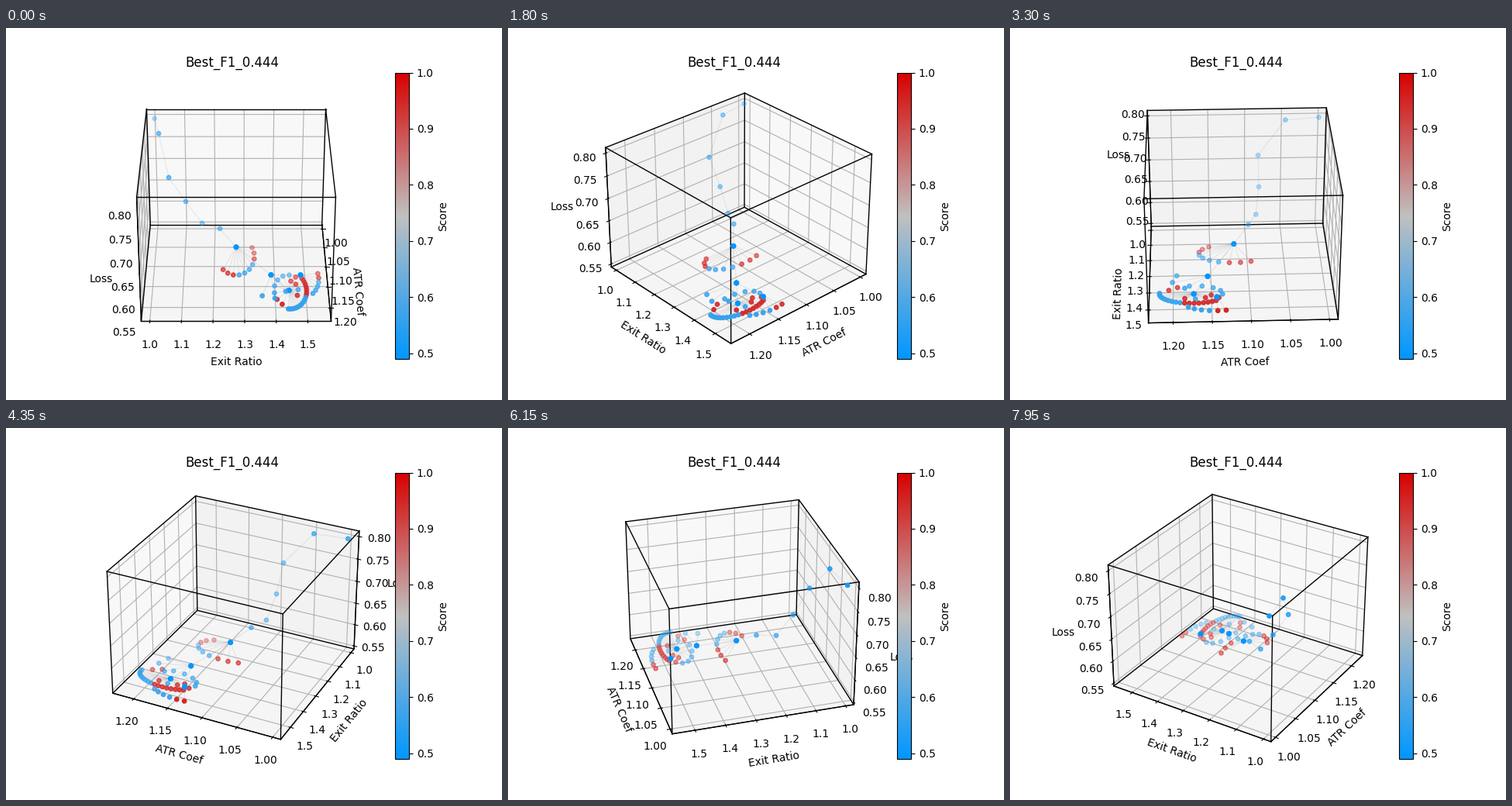
A matplotlib script for the animation above (8 s loop, 640 by 480 pixels).

```python
from itertools import combinations, product

import matplotlib.pyplot as plt
import numpy as np
from matplotlib.animation import FuncAnimation
from matplotlib.colors import LinearSegmentedColormap
from mpl_toolkits.mplot3d.art3d import Line3DCollection

INTERVAL, FRAMES = 50, 160
HOLD = 3          # frames per rotation step
STEP_DEG = 4
HUB_REPEATS = 6   # hubs were sampled repeatedly, so they look opaque
LOW, BLUE, RED = 0.4895, 0.56, 0.95
ATR_RADIUS, EXIT_RADIUS = 0.047, 0.060
LIMITS = [(0.9890, 1.2315), (0.9727, 1.5737), (0.5430, 0.8120)]

# Key points as ATR coef, exit ratio, loss
trunk = np.array([
    (1.0000, 1.0000, 0.7990), (1.0457, 1.0188, 0.8000),
    (1.0830, 1.0529, 0.7319), (1.0827, 1.1071, 0.6778),
    (1.0874, 1.1601, 0.6324), (1.0985, 1.2195, 0.6297)])
hubs = np.array([
    (1.1187, 1.2732, 0.6051), (1.1545, 1.3867, 0.5740),
    (1.1433, 1.4839, 0.5634), (1.1731, 1.4443, 0.5561)])
first, second, right, best = hubs


def arc(hub, loss, start, stop, count, blue, scale=1):
    """Neighbours on an ellipse around a hub, red outside the blue range."""
    t = np.linspace(0, 1, count)
    angle = np.radians(start + (stop - start) * t)
    xyz = np.column_stack([hub[0] + scale * ATR_RADIUS * np.sin(angle),
                           hub[1] + scale * EXIT_RADIUS * np.cos(angle),
                           np.full(count, loss)])
    score = np.where((blue[0] <= t) & (t <= blue[1]), BLUE, RED)
    return hub, xyz, score


arcs = [
    arc(first, 0.584, -28, 135, 10, blue=(0.25, 0.75)),
    arc(second, 0.565, 40, 120, 3, blue=(0, 1)),
    arc(right, 0.556, -14, 52, 6, blue=(0.3, 1)),
    arc(best, 0.557, -40, 95, 18, blue=(0.45, 1), scale=0.95),
    arc(best, 0.556, 120, 300, 8, blue=(0.25, 0.9), scale=0.8),
    arc(best, 0.556, -75, 30, 4, blue=(0.5, 0.8), scale=0.5),
]

points = np.vstack([trunk, *(xyz for _, xyz, _ in arcs),
                    np.repeat(hubs, HUB_REPEATS, axis=0)])
scores = np.concatenate([np.full(len(trunk), 0.52),
                         *(score for _, _, score in arcs),
                         np.full(len(hubs) * HUB_REPEATS, LOW)])

path = [*trunk, first, second]
edges = [*zip(path, path[1:]), (second, right), (second, best)]
edges += [(hub, end) for hub, xyz, _ in arcs for end in xyz]
# Two corners share a box edge when they differ along one axis only
box = [pair for pair in combinations(product(*LIMITS), 2)
       if sum(a != b for a, b in zip(*pair)) == 1]

fig = plt.figure(figsize=(6.4, 4.8), dpi=100)
ax = fig.add_subplot(projection="3d", computed_zorder=False)
cmap = LinearSegmentedColormap.from_list(
    "score", ["#0096ff", "#c0c0c0", "#d80000"])

ax.add_collection3d(Line3DCollection(
    edges, colors="0.5", alpha=0.15, linewidths=0.8, zorder=1))
for ends in box:
    ax.plot(*zip(*ends), color="black", linewidth=1, zorder=2)
dots = ax.scatter(*points.T, c=scores, cmap=cmap, vmin=LOW, vmax=1,
                  s=15, zorder=3)

ax.set(xlim=LIMITS[0], ylim=LIMITS[1], zlim=LIMITS[2],
       xlabel="ATR Coef", ylabel="Exit Ratio", title="Best_F1_0.444")
ax.zaxis.set_rotate_label(False)
ax.set_zlabel("Loss", rotation=0)
fig.colorbar(dots, ax=ax, label="Score")


def update(frame):
    ax.view_init(elev=30, azim=frame // HOLD * STEP_DEG)
    return []


anim = FuncAnimation(fig, update, frames=FRAMES, interval=INTERVAL,
                     init_func=lambda: [], repeat=True, repeat_delay=0)
plt.show()
```
